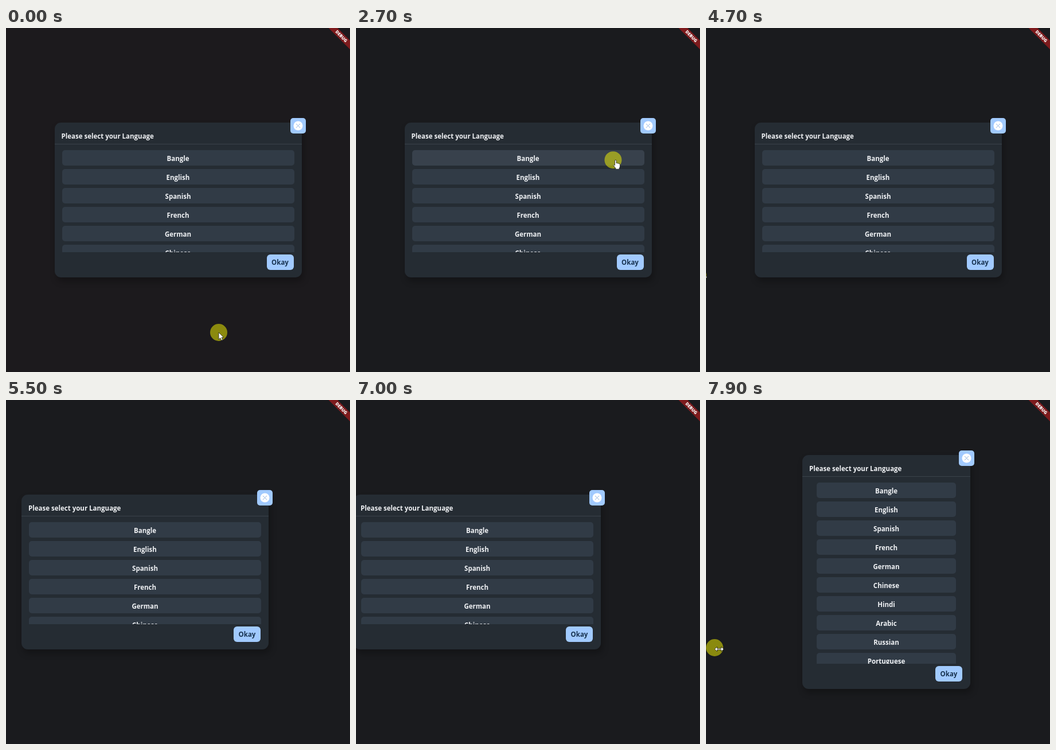
These frames come from a looping animation (600 px wide and 600 px high, 8000 ms). An HTML page:

```html
<!DOCTYPE html>
<html lang="en">
<head>
<meta charset="utf-8">
<title>Language dialog</title>
<style>
  html, body { margin: 0; width: 100%; height: 100%; overflow: hidden; background: #1a1b1e; }
  #stage {
    position: relative; width: 600px; height: 600px; overflow: hidden;
    background: #1a1b1e; color: #f0f2f5;
    font: 700 11.5px/27px "Open Sans", "Noto Sans", sans-serif;
  }
  #dialog {
    position: absolute; left: 0; top: 165px; width: 431px; height: 270px;
    border-radius: 11px; background: #252c33;
    box-shadow: 3px 7px 12px rgba(0, 0, 0, .28);
  }
  #title { position: absolute; left: 12px; top: 10px; white-space: nowrap; }
  #rule { position: absolute; left: 0; right: 0; top: 37px; height: 1px; background: #3a424a; }
  #list { position: absolute; left: 13px; right: 13px; top: 48px; bottom: 44px; overflow: hidden; }
  .row {
    height: 27px; margin-bottom: 6px; border-radius: 5px;
    background: #313b46; text-align: center; line-height: 29px;
  }
  .row.hover { background: #38414c; }
  #okay {
    position: absolute; right: 14px; bottom: 13px; width: 47px; height: 27px;
    border-radius: 6px; background: #a1caff; color: #17324f;
    text-align: center; line-height: 28px;
  }
  #close {
    position: absolute; right: -7px; top: -8px; width: 27px; height: 27px;
    border-radius: 5px; background: #a1caff;
  }
  #dialog.tall { top: 96px; width: 293px; height: 408px; }
  .tall #list { left: 25px; right: 25px; }
  #banner {
    position: absolute; left: 545px; top: 9px; width: 80px; height: 10.6px;
    transform: rotate(45deg); background: #7d1b1d; color: #fff; text-align: center;
    font: 800 7.5px/10.6px "Open Sans", "Noto Sans", sans-serif;
  }
  #pointer { position: absolute; left: 0; top: 0; width: 1px; height: 1px; overflow: visible; }
</style>
</head>
<body>
<div id="stage">
  <div id="dialog">
    <div id="title">Please select your Language</div>
    <div id="rule"></div>
    <div id="list"></div>
    <div id="okay">Okay</div>
    <svg id="close" viewBox="0 0 27 27">
      <circle cx="13.5" cy="13.5" r="8" fill="#fff"/>
      <path d="M10 10l7 7m0-7l-7 7" stroke="#8fb2de"/>
    </svg>
  </div>
  <div id="banner">DEBUG</div>
  <svg id="pointer">
    <circle r="15" fill="#fafa00" fill-opacity=".5"/>
    <g fill="#fff" stroke="#111" stroke-width=".7" stroke-linejoin="round">
      <path id="arrow" d="M0 0V12.2L2.8 9.6L4.8 14L6.9 13L5 8.8H8.7Z"/>
      <path id="hand" d="M3 1.5Q3 0 4.3 0T5.6 1.5V5.5Q7.2 4.6 8 6Q9.6 5.2 10.2 6.6Q12 6.2 12 8V11Q12 13 10.7 14.4V16H4.4V14.4Q2.3 12 .5 9.2Q.6 7.6 3 9.4Z"/>
      <path id="resize" d="M0 2.5L4.5 -1.5V1.5H11.5V-1.5L16 2.5L11.5 6.5V3.5H4.5V6.5Z"/>
    </g>
  </svg>
</div>
<script>
  const $ = id => document.getElementById(id);
  const LOOP = 8000, STEP = 100, DRAG = 4700;
  const languages = ["Bangle", "English", "Spanish", "French", "German",
    "Chinese", "Hindi", "Arabic", "Russian", "Portuguese"];
  const rows = languages.map(name => {
    const row = document.createElement("div");
    row.className = "row";
    row.textContent = name;
    $("list").append(row);
    return row;
  });

  // Stops of the pointer: time, x, y
  const stops = [
    [0, 371, 531], [1100, 371, 531], [1600, 480, 265], [2000, 507, 176],
    [2900, 440, 238], [3800, 269, 382], [DRAG, -14, 432]
  ];
  // Left window edge while it is dragged: time, x
  const drag = [[0, 0], [5200, 0], [5500, -115], [5900, -270],
    [6200, -296], [7000, -177], [7700, 29]];

  const linear = k => k;
  const smooth = k => k * k * (3 - 2 * k);

  function sample(path, t, ease) {
    const i = path.findIndex(key => key[0] > t);
    if (i < 0) return path.at(-1).slice(1);
    const a = path[i - 1], b = path[i], k = ease((t - a[0]) / (b[0] - a[0]));
    return a.slice(1).map((v, n) => v + (b[n + 1] - v) * k);
  }

  const within = (x, y, l, t, r, b) => x >= l && x <= r && y >= t && y <= b;
  const rowAt = (x, y) =>
    within(x, y, 98, 213, 502, 391) ? Math.floor((y - 210) / 33) : -1;

  function render(t) {
    // The dialog is centred in the window and turns tall when that is narrow.
    const [edge] = sample(drag, t, linear);
    const tall = edge > 0;
    $("dialog").className = tall ? "tall" : "";
    $("dialog").style.left = (600 + edge) / 2 - (tall ? 293 : 431) / 2 + "px";
    $("stage").style.background = t < 400 ? "#1c1a1d" : "#1a1b1e";

    const dragging = t >= DRAG;
    const [x, y] = dragging ? [edge - 14, 432] : sample(stops, t, smooth);
    $("pointer").style.transform = `translate(${x}px, ${y}px)`;

    const onButton = within(x, y, 496, 157, 523, 184) || rowAt(x, y) >= 0;
    const shape = dragging ? "resize" : onButton ? "hand" : "arrow";
    for (const id of ["arrow", "hand", "resize"])
      $(id).style.display = id === shape ? "" : "none";

    // The highlight trails the pointer by one step.
    const lit = dragging ? -1 : rowAt(...sample(stops, Math.max(0, t - STEP), smooth));
    rows.forEach((row, i) => row.classList.toggle("hover", i === lit));
  }

  const start = performance.now();
  function tick() {
    const t = (performance.now() - start) % LOOP;
    render(Math.floor(t / STEP) * STEP);
    requestAnimationFrame(tick);
  }
  render(0);
  requestAnimationFrame(tick);
</script>
</body>
</html>
```
